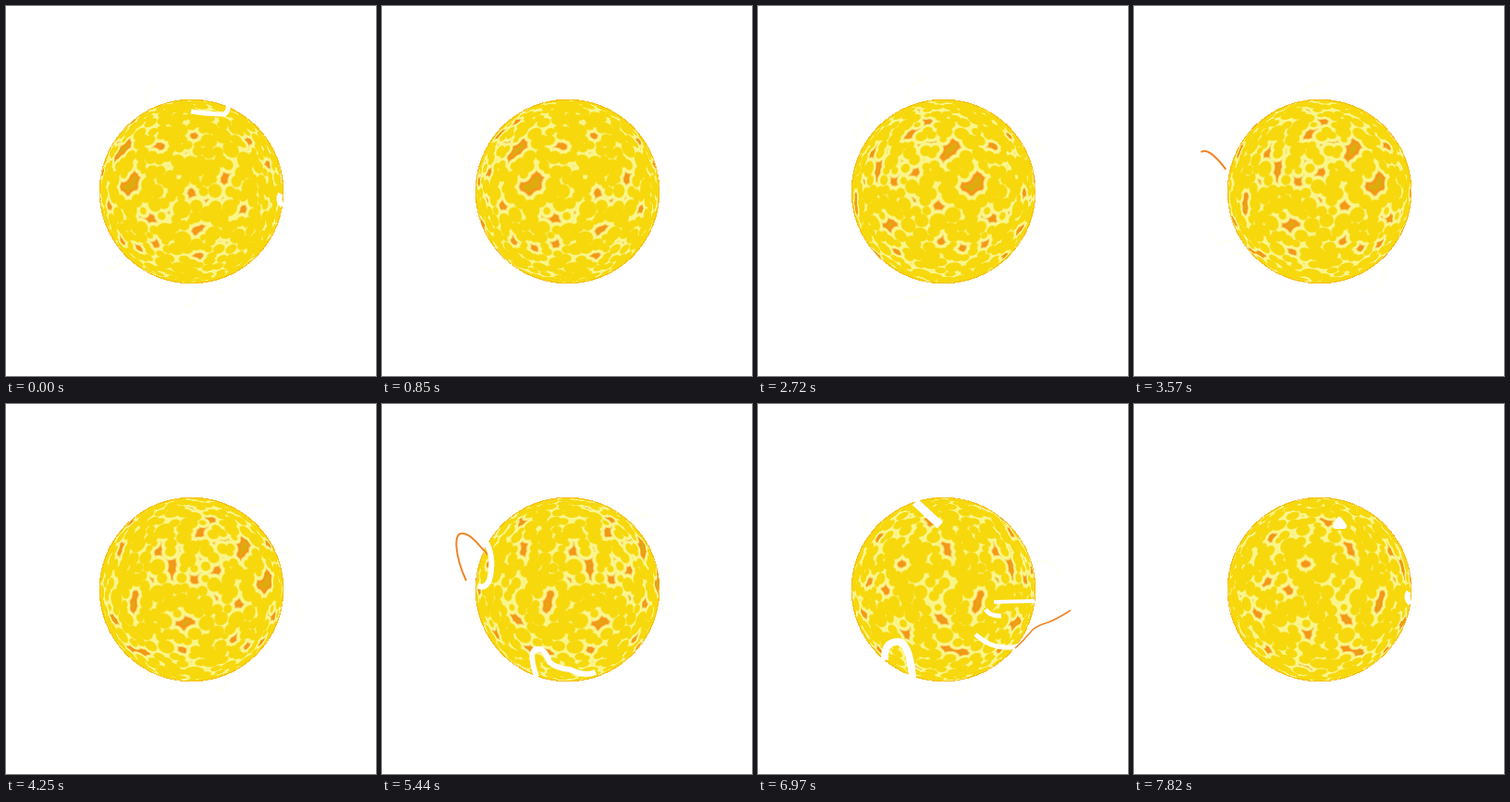
These frames come from a looping animation (400 by 400 pixels, 7.99 s). An HTML page with a canvas:

```html
<!DOCTYPE html>
<html lang="en">
<head>
<meta charset="utf-8">
<title>Sun</title>
<style>
html, body { margin: 0; width: 100%; height: 100%; overflow: hidden; background: #fff; }
canvas { display: block; width: 100vw; height: 100vh; }
</style>
</head>
<body>
<canvas id="stage" width="400" height="400"></canvas>
<script>
const LOOP = 7990, STEP = 170, SPIN = 22.5; // ms, ms, degrees per second
const C = 200.5, R = 99.8, RAD = Math.PI / 180;
const MAP_W = 480, MAP_H = 240;
const ctx = document.getElementById('stage').getContext('2d');

function randomiser(seed) {
  return () => {
    seed = (seed * 1664525 + 1013904223) >>> 0;
    return seed / 4294967296;
  };
}

const onSphere = (lon, lat) =>
  [Math.sin(lon) * Math.cos(lat), Math.sin(lat), Math.cos(lon) * Math.cos(lat)];
const dist = (a, b) => Math.hypot(a[0] - b[0], a[1] - b[1], a[2] - b[2]);
const clamp = v => Math.max(0, Math.min(1, v));

// Dark openings in the surface: longitude, latitude (down is positive)
const openings = [
  [2, -37], [21, -7], [0, 1], [-27, 17], [3, 25], [48, -33], [-37, -8], [-28, 35],
  [7, 44], [-22, -29], [35, 11], [60, -17], [-55, -30], [-63, 33], [-94, -6],
  [-65, 9], [-76, -49], [-79, -12], [-61, -22], [-45, -3], [-103, 41], [-46, 38],
  [-108, -12], [-89, -37], [-102, 22], [-139, 43], [-133, 3], [-119, -24],
  [-159, 18], [-154, -24], [-185, -16], [-210, -5], [-184, 29], [-154, 40],
  [-136, 12], [-168, -46], [-195, 1], [-223, 41], [-219, 16], [-215, -35]
].map(([lon, lat]) => onSphere(lon * RAD, lat * RAD));

// Overlapping discs, shrunk where needed to leave the openings free
function makeBlobs(count) {
  const rnd = randomiser(77), blobs = [];
  for (let tries = 0; blobs.length < count && tries < 12000; tries++) {
    const p = onSphere(rnd() * 2 * Math.PI, Math.asin(rnd() * 2 - 1));
    const room = Math.min(...openings.map(o => dist(o, p))) - 0.09;
    const r = Math.min(0.045 + 0.06 * rnd(), room);
    if (r > 0.03 && blobs.every(b => dist(b, p) > 0.75 * (r + b[3]))) blobs.push([...p, r]);
  }
  return blobs;
}

// Distance to the nearest blob edge over the whole sphere
function makeField() {
  const blobs = makeBlobs(680), field = new Float32Array(MAP_W * MAP_H);
  for (let j = 0; j < MAP_H; j++) {
    const lat = (j / (MAP_H - 1) - 0.5) * Math.PI;
    const near = blobs.filter(b => Math.abs(b[1] - Math.sin(lat)) < 0.3);
    for (let i = 0; i < MAP_W; i++) {
      const [x, y, z] = onSphere(i / MAP_W * 2 * Math.PI, lat);
      let best = 0.2;
      for (const b of near) {
        const dx = b[0] - x, dy = b[1] - y, dz = b[2] - z;
        const d = Math.sqrt(dx * dx + dy * dy + dz * dz) - b[3];
        if (d < best) best = d;
      }
      field[j * MAP_W + i] = best;
    }
  }
  return field;
}

function sample(field, lon, lat) {
  const turn = lon / (2 * Math.PI);
  const u = (turn - Math.floor(turn)) * MAP_W;
  const v = (lat / Math.PI + 0.5) * (MAP_H - 1);
  const i = Math.floor(u), j = Math.min(MAP_H - 2, Math.floor(v));
  const fu = u - i, fv = v - j;
  const a = j * MAP_W + i % MAP_W, b = j * MAP_W + (i + 1) % MAP_W;
  return (field[a] * (1 - fu) + field[b] * fu) * (1 - fv) +
    (field[a + MAP_W] * (1 - fu) + field[b + MAP_W] * fu) * fv;
}

const ORANGE = [245, 150, 24];
const ramp = [
  [0, [246, 216, 13]], [0.016, [250, 246, 140]], [0.04, [250, 244, 138]],
  [0.06, ORANGE], [0.078, ORANGE], [0.088, [220, 172, 15]]
];

function shade(d) {
  if (d <= 0) return ramp[0][1];
  for (let k = 1; k < ramp.length; k++) {
    const [d0, a] = ramp[k - 1], [d1, b] = ramp[k];
    if (d < d1) return a.map((c, n) => c + (b[n] - c) * (d - d0) / (d1 - d0));
  }
  return ramp[ramp.length - 1][1];
}
const palette = Array.from({ length: 128 }, (_, k) => shade(k / 1000));

const field = makeField();
const image = ctx.createImageData(400, 400);
image.data.fill(255);
const pixels = [];
for (let py = 100; py < 301; py++) {
  for (let px = 100; px < 301; px++) {
    const x = (px + 0.5 - C) / R, y = (py + 0.5 - C) / R;
    const rr = x * x + y * y;
    if (rr < 1) {
      pixels.push({
        at: (py * 400 + px) * 4, lon: Math.atan2(x, Math.sqrt(1 - rr)),
        lat: Math.asin(y), rim: rr > 0.975 ? 0.4 : 0
      });
    }
  }
}

function drawSurface(t) {
  const turn = t / 1000 * SPIN * RAD, data = image.data;
  for (const p of pixels) {
    const d = sample(field, p.lon - turn, p.lat);
    const c = palette[Math.max(0, Math.min(127, Math.round(d * 1000)))];
    for (let n = 0; n < 3; n++) data[p.at + n] = c[n] + (ORANGE[n] - c[n]) * p.rim;
  }
  ctx.putImageData(image, 0, 0);
}

const WHITE = '#fff', FIRE = '#f08426';
// peak time, half life, drift in px/s, width, colour, path
const flares = [
  [0, 500, 22, 5, WHITE, 'M200 114Q217 117 236 117Q241 114 240 107'],
  [0, 500, 0, 6, WHITE, 'M297 203Q293 210 299 216'],
  [1700, 500, 18, 4, WHITE, 'M129 275Q131 240 151 236'],
  [1700, 500, 18, 5, WHITE, 'M167 265Q166 280 171 298'],
  [3230, 400, 8, 2, FIRE, 'M82 200Q64 172 70 158Q79 151 102 184'],
  [5440, 850, 11, 2, FIRE, 'M91 191C79 165 77 140 86 140C97 139 106 156 119 167'],
  [5440, 500, 11, 6, WHITE, 'M113 150Q120 163 118 180Q116 201 104 197'],
  [5440, 500, 18, 6, WHITE, 'M167 295Q159 270 165 266Q175 261 181 279Q189 286 203 287Q219 295 231 290'],
  [6970, 450, 18, 9, WHITE, 'M170 106L197 131'],
  [6970, 450, 18, 8, WHITE, 'M137 277Q136 257 151 257Q164 257 167 296'],
  [6970, 450, 12, 4, WHITE, 'M255 214L299 213'],
  [6970, 450, 12, 5, WHITE, 'M246 222Q251 230 263 229'],
  [6970, 450, 12, 5, WHITE, 'M235 249Q250 263 267 263Q277 264 285 260'],
  [6970, 450, 0, 1.5, FIRE, 'M278 264Q287 256 296 245Q302 239 314 236Q324 232 338 223'],
  [7820, 400, 22, 6, WHITE, 'M218 132L222 125L227 132Z'],
  [7820, 300, 0, 6, WHITE, 'M297 203Q293 210 299 216']
].map(([peak, life, drift, width, colour, d]) =>
  ({ peak, life, drift, width, colour, path: new Path2D(d) }));

function drawFlares(t) {
  ctx.lineJoin = 'round';
  for (const f of flares) {
    const age = t - f.peak;
    if (Math.abs(age) >= f.life) continue;
    // Grows before the peak, then is eaten from its start
    const shown = clamp((f.life - Math.abs(age)) / (f.life * 0.6));
    ctx.save();
    ctx.translate(age / 1000 * f.drift, 0);
    if (shown < 1) {
      ctx.setLineDash([140 * shown, 400]);
      if (age > 0) ctx.lineDashOffset = -60 * (1 - shown);
    }
    ctx.lineWidth = f.width;
    ctx.strokeStyle = f.colour;
    ctx.stroke(f.path);
    ctx.restore();
  }
}

// Barely visible wisps just outside the limb
function drawWisps(t) {
  const rnd = randomiser(19 + 311 * Math.floor(t / 850));
  ctx.strokeStyle = '#fffff2';
  ctx.lineWidth = 2;
  for (let k = 0; k < 5; k++) {
    const a = rnd() * 2 * Math.PI, b = a + 0.1 + rnd() * 0.15, h = R + 6 + rnd() * 22;
    ctx.beginPath();
    ctx.moveTo(C + Math.cos(a) * (R + 2), C + Math.sin(a) * (R + 2));
    ctx.quadraticCurveTo(C + Math.cos(a) * h, C + Math.sin(a) * h,
      C + Math.cos(b) * h, C + Math.sin(b) * h);
    ctx.stroke();
  }
}

let last = -1;
function render(now) {
  const t = Math.floor(now % LOOP / STEP) * STEP;
  if (t !== last) {
    last = t;
    drawSurface(t);
    drawWisps(t);
    drawFlares(t);
  }
}

const start = performance.now();
function tick() {
  render(performance.now() - start);
  requestAnimationFrame(tick);
}
tick();
</script>
</body>
</html>
```
